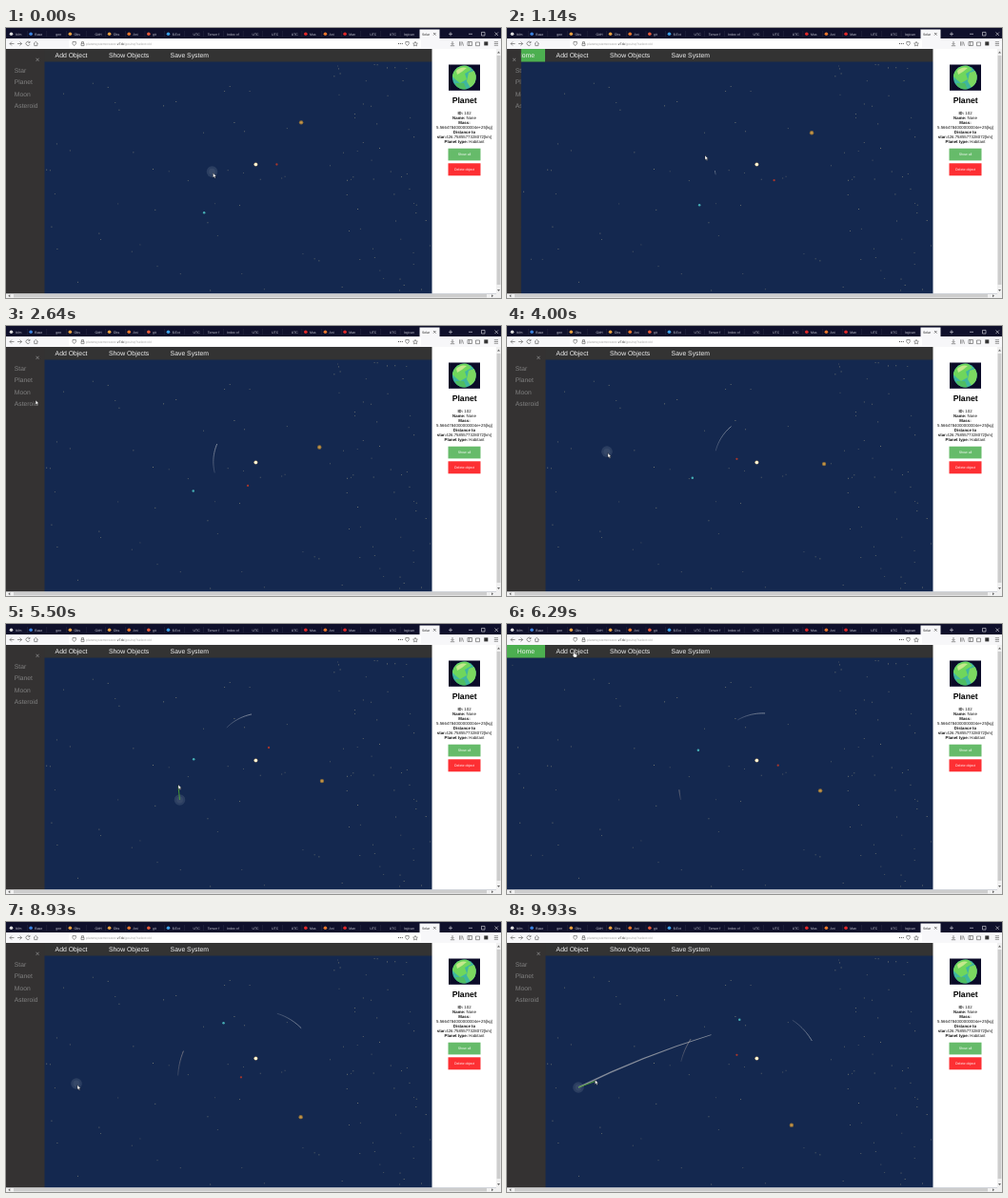
Recreate the animation shown at these times as an HTML page. Size 520 by 284 pixels, loop 10 s.

```html
<!DOCTYPE html>
<html lang="en">
<head>
<meta charset="utf-8">
<title>Planet system</title>
<style>
html, body { margin: 0; width: 100%; height: 100%; overflow: hidden; background: #14284f; }
svg { display: block; width: 100vw; height: 100vh; }
text { font-family: "Liberation Sans", Arial, sans-serif; text-rendering: geometricPrecision; white-space: pre; }
.mid { text-anchor: middle; }
.b { font-weight: bold; }
</style>
</head>
<body>
<svg id="stage" viewBox="0 0 520 284" preserveAspectRatio="none">
  <defs>
    <clipPath id="sideClip"><rect id="clipBox" y="22" width="40" height="258"/></clipPath>
    <clipPath id="globeClip"><circle cx="481.3" cy="52" r="12.4"/></clipPath>
  </defs>
  <rect width="520" height="284" fill="#14284f"/>
  <g id="sky" fill="#b7b08c"></g>
  <g id="bodies"></g>

  <rect y="22" width="448" height="13.5" fill="#333"/>
  <rect y="22" width="40" height="13.5" fill="#4caf50"/>
  <g fill="#f2f2f2" font-size="6.85">
    <text x="10.7" y="31.4">Home</text>
    <text x="51.6" y="31.4">Add Object</text>
    <text x="108" y="31.4">Show Objects</text>
    <text x="172.6" y="31.4">Save System</text>
  </g>
  <g id="side" clip-path="url(#sideClip)">
    <rect y="22" width="41" height="258" fill="#343232"/>
    <text id="close" class="mid" y="36.4" font-size="8" fill="#8a8a8a">×</text>
  </g>

  <rect x="447.5" y="22" width="68" height="257.5" fill="#fff"/>
  <rect x="465" y="38.5" width="33" height="27.3" fill="#0b0b28"/>
  <circle cx="481.3" cy="52" r="12.4" fill="#3fb6a0"/>
  <g clip-path="url(#globeClip)">
    <path d="M468 50Q472 39 484 39L489 44 482 48 484 54 477 58 472 54Z" fill="#6fd65c"/>
    <path d="M486 47L495 44 495 57 488 63 484 56Z" fill="#7cd860"/>
    <path d="M472 58L481 58 484 65 474 65Z" fill="#4fbd62"/>
    <path d="M473 45Q478 40 484 42L479 46 474 49Z" fill="#c4e88c"/>
  </g>
  <text class="mid b" x="481.7" y="79.4" font-size="8.7">Planet</text>
  <g id="info" font-size="4.33" fill="#111"></g>
  <rect x="464.5" y="126.7" width="34" height="12.7" fill="#66bb6a"/>
  <rect x="464.5" y="142.3" width="34" height="13" fill="#fd2f33"/>
  <g class="mid" font-size="3.6" fill="#fff">
    <text x="481.5" y="134.4">Show all</text>
    <text x="481.5" y="150">Delete object</text>
  </g>

  <rect width="520" height="11.5" fill="#0f102b"/>
  <g id="tabs" font-size="3.5"></g>
  <rect y="11" width="520" height="11" fill="#f7f7f9"/>
  <rect x="66" y="12.4" width="370" height="8.4" rx="1" fill="#fff"/>
  <g fill="none" stroke="#555" stroke-width=".6">
    <path d="M8.5 16.5H4M6 14.5L4 16.5 6 18.5M12 16.5H16.5M14.5 14.5L16.5 16.5 14.5 18.5"/>
    <path d="M24.8 15.2A2.1 2.1 0 1 0 25 17.2M25 14V15.6H23.4"/>
    <path d="M29 16.5L31.3 14.3 33.6 16.5M29.8 16V18.6H32.8V16"/>
    <path d="M70 14.5H73.4V16.8L71.7 18.6 70 16.8ZM79 16.3H82V18.6H79ZM79.5 16.3V14.6H81.5V16.3"/>
    <path d="M419.8 14.5H423.2V16.8L421.5 18.6 419.8 16.8ZM430 14.3L430.8 16 432.4 16.2 431.2 17.3 431.5 18.9 430 18 428.5 18.9 428.8 17.3 427.6 16.2 429.2 16Z"/>
    <path d="M469 14V17.3M467.5 16L469 17.5 470.5 16M466.8 18.7H471.2M476.5 14.3V18.7M478 14.3V18.7M479.3 14.5L480.5 18.7"/>
    <path d="M485 14.5H489.5V18.5H485ZM486.8 14.5V18.5M493.5 15H497.5V18.7H493.5Z"/>
    <path d="M512.8 14.7H517M512.8 16.5H517M512.8 18.3H517"/>
    <path d="M412 16.5H417" stroke-dasharray="1 .9" stroke-width="1"/>
  </g>
  <rect x="502.3" y="14.4" width="4" height="4" fill="#333"/>
  <text x="84" y="17.9" font-size="3.5" fill="#a4a4a4">planetsystemcreator-<tspan fill="#222">v7.tk</tspan>/jpcuhqi?select=<tspan id="hash">##</tspan></text>

  <rect x="515" y="22" width="5" height="262" fill="#f0f0f0"/>
  <rect x="515.6" y="29" width="3.8" height="241" fill="#cdcdcd"/>
  <rect y="279.3" width="515" height="4.7" fill="#f0f0f0"/>
  <rect x="8" y="280" width="497" height="3.4" fill="#cdcdcd"/>
  <path d="M4.3 280.2V283.2L2.3 281.7ZM510 280.2V283.2L512 281.7ZM516 275H519L517.5 277ZM516 26.5H519L517.5 24.5Z" fill="#666"/>
  <g id="status">
    <rect y="278.7" width="68" height="5.3" fill="#e9e9ec" stroke="#bbb" stroke-width=".3"/>
    <text x="1" y="282.6" font-size="2.95" fill="#555">planetsystemcreator-v7.tk/jpcuhqi?select=##</text>
  </g>
  <g id="cursor" fill="#fff" stroke="#111" stroke-width=".35">
    <path id="arrow" d="M0 0V4.7L1.1 3.8 1.9 5.5 2.7 5.1 1.9 3.5H3.4Z"/>
    <path id="hand" d="M-.4 0Q.2-.6.8 0V2L3.2 2.6Q3.8 3 3.5 4.2L3 6H.3L-1.3 3.7Q-1.1 3-.4 3.4Z"/>
  </g>
</svg>
<script>
const LOOP = 10, SUN = [262.4, 143.5], TAIL = 1.8, STEPS = 18;
const $ = id => document.getElementById(id);
const clamp = v => Math.max(0, Math.min(1, v));
const smooth = v => { v = clamp(v); return v * v * (3 - 2 * v); };
const lerp = (a, b, p) => a + (b - a) * p;
const sin = deg => Math.sin(deg * Math.PI / 180);

function set(el, attrs) {
  for (const k in attrs) el.setAttribute(k, attrs[k]);
  return el;
}
function add(parent, tag, attrs, text) {
  const el = set(document.createElementNS('http://www.w3.org/2000/svg', tag), attrs);
  if (text) el.textContent = text;
  parent.appendChild(el);
  return el;
}
const show = (el, on) => { el.style.display = on ? '' : 'none'; };
const place = (el, [x, y]) => el.setAttribute('transform', `translate(${x} ${y})`);

// All motion is in seconds; orbits give a place from angle and radius
const polar = (deg, r) => [SUN[0] + r * sin(deg + 90), SUN[1] + r * sin(deg)];
const amberAt = t => polar(-42.8 + 11.3 * t - .07 * t * t, 65 + 1.42 * t);
const tealAt = t => polar(136.9 + 6.7 * t + .0435 * t ** 3, 74.3 - .3 * t * t);
function redAt(t) {
  const u = t / 5.93 % 1, deg = 360 * (.6 * u + .4 * u ** 3);
  return polar(deg, 22 + 4 * sin(deg));
}
const rocks = [
  { start: .9, color: '#cdd0d4', at: s => polar(165.8 + 23.6 * s - .45 * s * s, 44.5 + .2 * s * s) },
  { start: 5.6, color: '#b8aaa4', at: s => polar(152.6 + 9.6 * s + .12 * s * s, 90 - 4.1 * s) }
];

// Cursor legs: leave, arrive, x, y
const legs = [[0, 0, 217.5, 152.6], [.12, .8, 208, 134], [1.14, 1.7, 70, 29], [1.85, 2.8, 28, 82], [3.29, 4.7, 182, 184],
  [4.95, 5.4, 181, 169], [5.62, 6.3, 70, 29], [6.5, 6.9, 26.5, 82], [8.28, 8.42, 33, 79], [8.6, 8.92, 75, 171.5], [9.1, 9.9, 92.5, 166]];
function mouseAt(t) {
  let [, , x, y] = legs[0];
  for (const [from, to, nx, ny] of legs) {
    if (t <= from) break;
    const p = smooth((t - from) / (to - from));
    x = lerp(x, nx, p);
    y = lerp(y, ny, p);
  }
  return [x, y];
}

const drags = [
  { show: 0, press: .12, drop: .9, at: [218, 153] },
  { show: 4, press: 4.9, drop: 5.6, at: [182.5, 185] },
  { show: 8.6, press: 9.1, drop: LOOP, at: [75, 174], aim: true }
];

// Side menu closes after each launch, then opens again
function sideWidth(t) {
  const slide = at => smooth((t - at) / .4);
  return 40.5 * (1 - slide(.905) + slide(1.78) - slide(5.65) + slide(6.5));
}

let seed = 11;
const rand = () => (seed = seed * 16807 % 2147483647) / 2147483647;
for (let i = 0; i < 115; i++) {
  const x = i % 3 ? 5 + 440 * rand() : 340 + 92 * rand();
  add($('sky'), 'rect', { x, y: 38 + 238 * rand(), width: .9, height: .9, opacity: .35 + .35 * rand() });
}

const tabs = $('tabs');
const labels = 'It.fm,Base,gen,Obs,GitH,Obs,Ani,git,$.Ext,UTC,Tensor f,Index of,UTC,UTC,UTC,Mus,Ani,Man,UTC,UTC,logican'.split(',');
const icons = { 'It.fm': '#ddd', Base: '#3b82e0', Obs: '#e8a040', Ani: '#e8762c', git: '#e65a38', '$.Ext': '#3aa0e8', Mus: '#e02828', Man: '#e02828' };
labels.forEach((s, i) => {
  const x = 5.5 + i * 20.62, icon = icons[s];
  if (icon) add(tabs, 'circle', { cx: x, cy: 6.3, r: 1.8, fill: icon });
  add(tabs, 'text', { x: x + (icon ? 4.2 : s.length > 5 ? 0 : 5.5), y: 7.7, fill: '#c9cad6' }, s);
  if (i) add(tabs, 'rect', { x: x - 4, y: 3, width: .3, height: 6, fill: '#3a3c50' });
});
add(tabs, 'rect', { x: 434.5, y: 1.5, width: 21, height: 10, fill: '#f7f7f9' });
add(tabs, 'text', { x: 437, y: 7.7, fill: '#222' }, 'Solar');
add(tabs, 'path', { d: 'M449 5L451.6 7.6M451.6 5L449 7.6', stroke: '#333', 'stroke-width': .6 });
add(tabs, 'path', { d: 'M465 6.3H469M467 4.3V8.3M486 6.3H490M499.5 4.4H503V8H499.5ZM513.5 4.5L517 8M517 4.5L513.5 8', fill: 'none', stroke: '#e4e4ea', 'stroke-width': .6 });

[['ID:', ' 102'], ['Name:', ' None'], ['Mass:', ''], ['', '5.5664784000000004e+25[kg]'], ['Distance to', ''],
  ['star:', '426.7585577328072[km]'], ['Planet type:', ' Habitant']].forEach(([key, val], i) => {
  const line = add($('info'), 'text', { x: 481.5, y: 91.2 + i * 4.9, class: 'mid' });
  add(line, 'tspan', { class: 'b' }, key);
  add(line, 'tspan', {}, val);
});
const items = ['Star', 'Planet', 'Moon', 'Asteroid'].map((s, i) =>
  add($('side'), 'text', { x: 8.8, y: 47.1 + i * 12.3, 'font-size': 6.75 }, s));

const bodies = $('bodies');
const ball = (r, fill, opacity = 1, parent = bodies) => add(parent, 'circle', { r, fill, opacity });
const halo = add(bodies, 'g', {});
ball(5.8, '#64748a', .3, halo);
ball(3.4, '#7b8794', .15, halo);
const guess = add(bodies, 'path', { fill: '#858c9a' });
const pull = add(bodies, 'line', { stroke: '#4fa532', 'stroke-width': .9 });
for (const rock of rocks) {
  rock.g = add(bodies, 'g', { stroke: rock.color, 'stroke-width': .8 });
  rock.parts = Array.from({ length: STEPS }, (_, i) => add(rock.g, 'line', { opacity: .25 + .5 * i / STEPS }));
}
place(ball(2, '#cfa878'), SUN);
place(ball(1.6, '#ffffdc'), SUN);
const amber = add(bodies, 'g', {});
ball(2.2, '#8f6f38', 1, amber);
ball(1.2, '#c4954a', 1, amber);
const teal = ball(1.25, '#45adb4');
const red = ball(1.15, '#a8362c');

function drawDrag(t, tip) {
  const d = drags.find(k => t >= k.show && t < k.drop), pressed = d && t >= d.press;
  show(halo, d);
  show(pull, pressed);
  show(guess, pressed && d.aim);
  if (!d) return;
  const [x, y] = pressed ? d.at : [tip[0] - 1, tip[1] - 1.5];
  place(halo, [x, y]);
  if (!pressed) return;
  set(pull, { x1: x, y1: y, x2: tip[0], y2: tip[1] + 1.5 });
  // The predicted path grows with the pull
  const s = clamp((tip[0] - x) / 17.5), cx = x + 67 * s, cy = y - 33 * s;
  const ex = x + 139.5 * s, ey = y - 55.3 * s;
  guess.setAttribute('d', `M${x - .3} ${y - .8}Q${cx} ${cy - .7} ${ex} ${ey - .4}V${ey + .4}Q${cx} ${cy + .7} ${x + .3} ${y + .8}Z`);
}

function drawRock({ start, at, g, parts }, t) {
  const age = t - start, from = Math.max(0, age - TAIL);
  show(g, age >= 0);
  let a = at(from);
  parts.forEach((el, i) => {
    const b = at(lerp(from, age, (i + 1) / STEPS));
    set(el, { x1: a[0], y1: a[1], x2: b[0], y2: b[1] });
    a = b;
  });
}

function draw(t) {
  const tip = mouseAt(t), w = sideWidth(t);
  place(amber, amberAt(t));
  place(teal, tealAt(t));
  place(red, redAt(t));
  rocks.forEach(rock => drawRock(rock, t));
  drawDrag(t, tip);

  $('clipBox').setAttribute('width', w);
  $('close').setAttribute('x', w - 7.3);
  const [hx, hy] = mouseAt(t - .15);
  const row = hx < 30 && w > 30 ? Math.floor((hy - 38.5) / 12.3) : -1;
  items.forEach((el, i) => el.setAttribute('fill', i === row ? '#f1f1f1' : '#818181'));
  $('hash').textContent = row < 0 ? '##' : '##moon';
  show($('status'), row === 3 && t > 5);

  const linked = tip[1] < 35 || row >= 0;
  show($('hand'), linked);
  show($('arrow'), !linked);
  place($('cursor'), tip);
}

const begin = performance.now();
function tick() {
  draw((performance.now() - begin) / 1000 % LOOP);
  requestAnimationFrame(tick);
}
tick();
</script>
</body>
</html>
```
